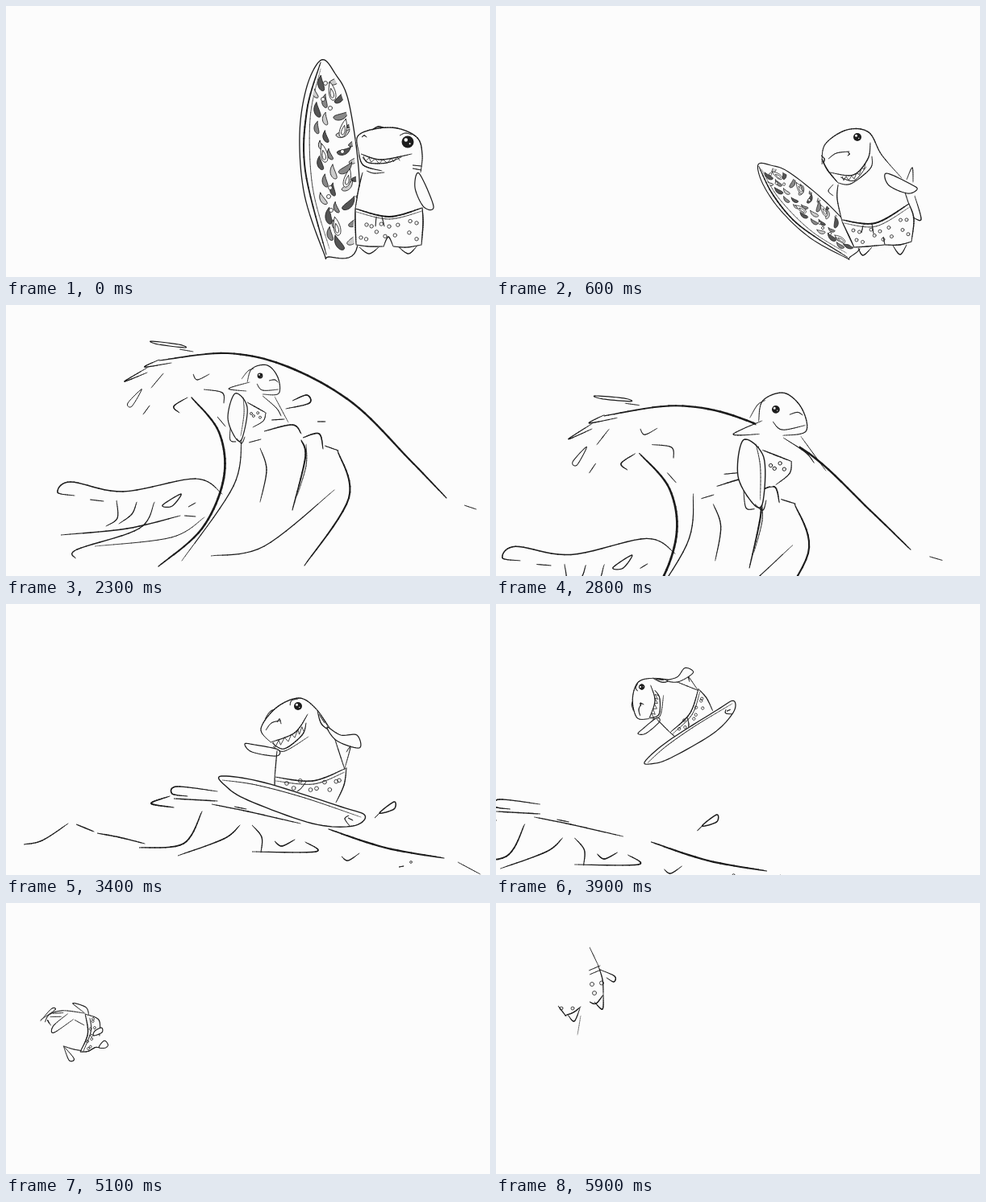
An HTML page with a canvas for the animation above (6 s loop, 600 px wide and 337 px high).

```html
<!DOCTYPE html>
<html lang="en">
<head>
<meta charset="utf-8">
<title>Surfing shark</title>
<style>
html, body { margin: 0; width: 100%; height: 100%; overflow: hidden; background: #fcfcfc; }
canvas { display: block; width: 600px; height: 337px; }
</style>
</head>
<body>
<canvas id="stage" width="600" height="337"></canvas>
<script>
const ctx = document.getElementById('stage').getContext('2d');
const PAPER = '#fcfcfc', INK = '#1c1c1c', LOOP = 6000;
let thin = 1;     // keeps line weight readable when a drawing is scaled
let reveal = 1;   // drawn share of each brush stroke

function points(text) {
  const p = [];
  text.split(' ').forEach(s => p.push(s.split(',').map(Number)));
  return p;
}

// Catmull-Rom through the points, sampled to a polyline.
function curve(text, closed) {
  const p = points(text), n = p.length, out = [], segs = closed ? n : n - 1;
  const at = i => closed ? p[(i + n) % n] : p[Math.max(0, Math.min(n - 1, i))];
  for (let i = 0; i < segs; i++) {
    const [a, b, c, d] = [at(i - 1), at(i), at(i + 1), at(i + 2)];
    for (let k = 0; k < 10; k++) {
      const u = k / 10;
      out.push([0, 1].map(j => b[j] + .5 * u * (c[j] - a[j]
        + u * (2 * a[j] - 5 * b[j] + 4 * c[j] - d[j]
        + u * (3 * (b[j] - c[j]) + d[j] - a[j])))));
    }
  }
  out.push(at(segs));
  return out;
}

function trace(p) {
  ctx.beginPath();
  p.forEach(q => ctx.lineTo(q[0], q[1]));
}

function dot(x, y, r) {
  ctx.beginPath();
  ctx.arc(x, y, r, 0, 7);
}

// Tapered brush stroke.
function ink(size, text) {
  const p = curve(text), last = p.length - 1, end = Math.round(last * reveal);
  for (let i = 0; i < end; i++) {
    ctx.lineWidth = size * thin * (.35 + .65 * Math.sqrt(Math.sin(Math.PI * (i + .5) / last)));
    trace([p[i], p[i + 1]]);
    ctx.stroke();
  }
}

// Closed outline on paper; size 0 only covers what lies behind.
function shape(size, text) {
  trace(curve(text, true));
  ctx.closePath();
  ctx.fillStyle = PAPER;
  ctx.fill();
  ctx.lineWidth = size * thin;
  if (size) ctx.stroke();
}

// Zigzag hanging from a curve.
function teeth(n, depth, text) {
  const p = curve(text), last = p.length - 1, zig = [];
  for (let i = 0; i <= n; i++) {
    const [x, y] = p[Math.round(last * i / n)];
    zig.push([x, y + (i % 2) * depth]);
  }
  ctx.lineWidth = .8 * thin;
  trace(zig);
  ctx.stroke();
}

// Small blossoms scattered to both sides of a curve.
function blossoms(n, r, spread, text) {
  const p = curve(text), last = p.length - 1;
  ctx.lineWidth = .8 * thin;
  for (let i = 0; i < n; i++) {
    const [x, y] = p[Math.round(last * i / Math.max(1, n - 1))];
    dot(x, y + spread * Math.sin(i * 2.3), r);
    ctx.stroke();
  }
}

function eye(x, y, r) {
  ctx.fillStyle = INK;
  dot(x, y, r); ctx.fill();
  ctx.fillStyle = PAPER;
  dot(x - r * .3, y - r * .35, r * .3); ctx.fill();
  dot(x + r * .35, y + r * .3, r * .13); ctx.fill();
}

function leaf(x, y, h, rot, bend, fill) {
  ctx.save();
  ctx.translate(x, y);
  ctx.rotate(rot);
  ctx.beginPath();
  ctx.moveTo(0, -h);
  ctx.bezierCurveTo(h * .5 + bend, -h * .2, h * .4, h * .8, 0, h * .8);
  ctx.bezierCurveTo(-h * .4, h * .8, -h * .4 + bend, -h * .2, 0, -h);
  ctx.fillStyle = fill;
  ctx.fill();
  ctx.stroke();
  ctx.restore();
}

function board() {
  shape(1.3, '391,67 373,100 364,160 370,235 394,307 400,312 434,304 438,215 425,120 408,84');
  ink(2, '390,70 373,130 371,205 397,309');
  ink(.8, '390,78 377,140 380,225 401,302');
  ctx.save();
  trace(curve('390,78 377,145 381,225 402,301 431,297 433,200 415,108', true));
  ctx.clip();
  let seed = 7;
  const rnd = () => (seed = seed * 16807 % 2147483647) / 2147483647;
  ctx.lineWidth = .8 * thin;
  for (let i = 0; i < 40; i++) {
    const y = 86 + i * 5.5, mid = 393 + (y - 80) * .11, odd = i % 2;
    const x = mid + (odd ? 18 : -11) + (i % 4 < 2 ? -6 : 6) + rnd() * 6;
    leaf(x, y, 7 + rnd() * 5, (odd ? .6 : -.6) + rnd() * .6, odd ? 5 : -5, ['#888', '#ccc', '#555'][i % 3]);
  }
  points('404,107 418,153 394,184 423,215 410,275').forEach(([x, y], i) => {
    const turn = i % 2 ? .25 : -.2;
    leaf(x, y, 13, turn, 0, PAPER);
    leaf(x, y + 2, 6.5, turn, 0, PAPER);
  });
  ctx.fillStyle = PAPER;
  points('396,96 393,116 402,127 417,181 402,226 400,237 403,254').forEach(([x, y]) => {
    dot(x, y, 2.5);
    ctx.fill();
    ctx.stroke();
  });
  ctx.restore();
}

function standing() {
  shape(0, '436,162 470,150 510,164 514,205 517,250 515,297 475,291 434,297 433,252 442,205 437,180');
  ink(1.4, '437,181 436,162 456,153 485,152 510,164 516,185 514,207');
  ink(1.2, '454,154 461,150 468,151');
  ink(1.3, '437,181 443,198 466,205');
  ink(1.4, '440,184 465,191 503,184');
  ink(1.2, '442,188 450,195 472,195 490,188');
  teeth(11, 5, '443,187 465,191 488,187');
  ink(.8, '441,163 444,161 447,163');
  ink(.8, '488,161 495,158 503,160');
  eye(498, 169, 7.5);
  ink(1, '504,198 515,199');
  ink(1, '504,202 515,204');
  ink(1.3, '442,207 437,228 433,252');
  ink(.9, '447,205 456,208 469,207');
  shape(1.2, '512,208 530,249 518,250 507,226');
  ink(1.9, '433,252 475,262 516,251');
  ink(.8, '434,256 475,265 516,255');
  ink(1.5, '433,252 433,270 434,297');
  ink(1.5, '516,251 517,270 515,297');
  ink(1.2, '434,297 450,299 468,299');
  ink(1.2, '468,299 474,287 480,299');
  ink(1.2, '480,299 497,300 515,297');
  ink(1, '459,262 458,274');
  ink(1, '466,262 469,274');
  blossoms(7, 2.2, 2, '447,272 475,273 509,268');
  blossoms(7, 2.2, 4, '440,288 470,284 509,286');
  ink(1.2, '438,300 450,308 462,300');
  ink(1.2, '487,300 499,308 509,299');
}

function leaning() {
  shape(0, '403,183 435,154 462,157 503,215 516,293 444,300 429,268 424,222');
  ink(1.3, '404,197 408,172 435,154 462,157 478,185 503,214');
  ink(1.5, '404,190 411,204 424,220');
  ink(1.3, '414,207 443,210 461,190 464,170');
  ink(1.1, '424,220 440,221 464,202 466,187');
  ink(1, '427,213 444,217 459,200');
  teeth(10, 5, '429,212 444,210 458,196');
  ink(1, '412,190 422,183 438,181');
  ink(.8, '436,181 438,184 436,186');
  eye(448, 163, 5);
  ink(1, '403,186 407,190 406,196');
  ink(1.2, '424,222 423,240 429,268');
  shape(1.2, '484,208 515,222 522,228 510,233 487,223');
  ink(1, '507,232 512,247');
  ink(1, '509,216 516,201 517,219');
  ink(1.2, '519,236 527,265 517,263');
  ink(1.9, '429,266 470,270 512,246');
  ink(.8, '431,270 471,274 513,250');
  ink(1.4, '429,268 437,285 444,300');
  ink(1.4, '512,246 518,265 515,293');
  ink(1.3, '444,300 460,299 482,297');
  ink(1.3, '482,297 500,297 515,293');
  ink(1, '480,287 482,297');
  ink(1, '455,273 453,282');
  ink(1, '466,271 468,283');
  blossoms(7, 2, 2, '443,279 476,279 509,264');
  blossoms(7, 2, 4, '447,291 480,288 511,280');
  ink(1.2, '449,301 455,310 466,300');
  ink(1.2, '492,298 501,309 509,297');
  ink(.8, '418,236 412,230 418,222');
}

function perched() {
  shape(0, '364,47 374,30 402,35 411,66 392,83 388,115 350,111 348,83 368,56');
  ink(1.2, '364,47 374,31 393,29 407,45 411,66 403,67');
  ink(1.1, '364,47 370,54 390,54');
  ink(1.2, '366,51 388,61 398,56');
  eye(397, 48, 3.8);
  ink(1.1, '366,57 351,80 348,84');
  ink(1.1, '400,68 392,83 392,89');
  ink(1, '363,40 356,50 358,60');
  ink(1, '391,76 399,97 394,95');
  ink(1.6, '348,83 372,93 392,89');
  ink(1.2, '348,83 346,100 350,111');
  ink(1.2, '391,89 393,103 388,115');
  ink(1.1, '350,111 365,115 388,116');
  blossoms(5, 1.8, 2, '354,95 372,99 387,97');
  blossoms(5, 1.8, 2, '353,104 370,108 386,106');
  ink(1.1, '390,107 405,111 390,118');
  ink(1, '349,112 353,120 358,115');
  ink(1, '371,117 380,122 387,118');
}

function riding() {
  shape(0, '300,90 312,75 332,80 340,105 320,135 300,152 296,106');
  ink(1.1, '299,96 305,79 324,75 337,90 338,110 318,111');
  ink(.9, '311,98 318,106 338,105');
  ink(.8, '326,94 333,93 337,96');
  eye(315, 88, 3.4);
  ink(.7, '292,92 300,82 307,79');
  ink(1, '302,96 276,104 298,107');
  ink(1, '318,113 335,128 341,138');
  ink(.8, '333,114 350,146');
  ink(1.2, '299,121 322,134');
  ink(1, '322,134 319,144 306,152');
  blossoms(4, 1.5, 3, '304,135 315,138');
  shape(1.2, '284,110 275,140 285,166 293,165 299,127');
  ink(.7, '294,115 295,135 291,163');
  ink(.9, '278,153 278,168 285,170');
  ink(.9, '286,166 292,172 296,164');
}

function gliding() {
  shape(0, '316,155 350,121 375,120 405,160 422,205 409,248 333,224 332,178');
  ink(1.3, '328,172 316,155 335,129 363,117 384,130 405,160');
  ink(1, '322,157 329,148 340,145');
  ink(.8, '336,147 339,143 341,149');
  ink(.9, '321,143 327,134 333,131');
  eye(362, 127, 5);
  ink(.8, '352,126 354,120 362,118');
  ink(1.3, '328,172 358,160 374,137');
  ink(1.3, '330,173 345,180 367,163 372,148');
  teeth(11, 7, '331,172 352,163 369,151');
  ink(.9, '331,177 345,183 375,165');
  ink(1.2, '386,133 391,149 402,158');
  ink(1, '388,137 395,148');
  ink(1, '391,139 399,152');
  shape(1.2, '337,181 308,175 296,174 305,184 335,189');
  ink(1.2, '336,182 333,216');
  ink(1.1, '407,166 420,206');
  shape(1.2, '398,153 415,163 435,163 438,179 410,170');
  ink(1, '420,204 427,178 422,184');
  ink(1.5, '333,215 380,220 422,204');
  ink(.9, '334,220 381,224 420,209');
  ink(1.3, '422,204 419,225 409,247');
  ink(1, '333,216 333,226');
  ink(.9, '372,221 366,229 361,233');
  blossoms(9, 2.4, 6, '348,223 385,228 413,222');
  shape(1.4, '267,214 320,222 415,252 445,263 430,276 380,273 300,244 272,226');
  ink(1, '268,219 310,225 370,241 440,265');
  ink(1, '425,263 420,267 426,276');
  ink(1, '424,266 430,269');
}

function diving() {
  ink(1.1, '102,129 88,150 95,155 102,129');
  ink(1, '102,129 107,145 113,158');
  ink(1.5, '110,157 142,150 166,128');
  ink(1, '113,161 148,152 165,138');
  ink(1.3, '110,157 118,167 130,173 134,179');
  ink(1.2, '166,128 171,152 150,168');
  shape(1.3, '145,160 157,168 163,163 152,157');
  shape(1.2, '134,178 139,187 146,188 148,179');
  blossoms(9, 2, 4, '122,165 143,156 167,145');
  ink(1, '114,74 141,77 143,83 116,73');
  ink(1.1, '117,81 132,80 150,95 167,127');
  ink(.8, '119,88 122,83 118,92');
  ink(.8, '129,83 140,98');
  ink(.8, '136,83 147,97');
  ink(1.1, '150,104 120,96 111,103 148,117');
  ink(.8, '148,119 150,137');
  ink(1.1, '167,125 169,101 176,122 169,133');
}

function legs() {
  ink(.9, '116,55 126,76');
  ink(1.2, '126,76 132,95 133,113');
  ink(.9, '115,84 129,78');
  ink(.9, '116,89 130,83');
  ink(1.2, '129,83 147,91 146,98 137,93');
  blossoms(3, 2.5, 2, '119,101 131,98 122,114');
  ink(1.3, '116,123 124,125 133,114');
  ink(1.3, '122,123 132,132 133,114');
  blossoms(2, 2, 0, '81,131 95,131');
  ink(1.2, '77,128 87,141');
  ink(1.3, '85,140 96,136 105,129');
  ink(1.2, '89,139 97,147 104,131');
  ink(.5, '105,140 101,164');
}

function bigWave() {
  ink(1.9, '272,81 325,79 400,102 465,155 520,220 572,254');
  ink(1.2, '272,81 240,95 222,122 242,130 270,115');
  ink(1.3, '270,113 285,119 310,123');
  ink(1.3, '305,126 325,126 345,112');
  ink(2, '270,116 281,165 240,218 150,263');
  ink(1.5, '309,125 313,165 277,220');
  ink(1, '360,115 350,175 290,228');
  ink(1.1, '388,125 367,190 325,228');
  ink(.9, '396,130 375,195');
  ink(1.9, '431,173 425,220 375,268 283,294');
  ink(1.8, '48,302 90,270 150,263 240,276 310,277 370,262');
  ink(.8, '68,314 120,298 210,299');
  ink(1, '388,120 408,137');
  ink(1, '411,130 412,148 432,157');
  ink(1.5, '425,165 434,175 462,168');
  ink(1, '424,176 428,181 422,180');
  ink(1, '461,177 466,211');
  ink(1, '468,180 500,213 560,248');
  ink(1.4, '414,248 428,222 490,221 535,246 521,254');
  ink(1.5, '415,246 436,254 461,256');
  ink(1, '462,240 503,252');
  ink(1.6, '432,258 405,295 340,313');
  ink(1, '453,257 445,290 412,307');
  ink(1.5, '525,258 518,295 490,318');
  ink(1.5, '355,326 410,322 447,295');
  shape(1, '230,155 244,150 237,158');
  blossoms(2, 2.3, 0, '316,91 394,282');
  blossoms(2, 1.5, 0, '434,90 456,207');
}

function barrel() {
  ink(2.5, '190,69 275,60 350,77 430,122 500,192 546,240');
  ink(.9, '568,249 583,254');
  shape(1.2, '180,45 214,49 222,53 189,49');
  ink(.9, '215,55 232,58');
  ink(1.3, '205,72 172,77 190,68');
  ink(1.3, '175,78 147,95 175,84');
  shape(1, '168,105 151,122 156,126');
  ink(1, '178,125 170,136');
  ink(1, '195,85 180,103');
  ink(1, '232,86 237,93 252,86');
  ink(1.3, '225,115 208,126 215,134');
  ink(2.7, '230,115 264,158 270,215 243,278 189,325');
  ink(1.3, '292,165 282,225 218,318');
  ink(1.3, '315,178 323,205 315,245');
  ink(2, '366,168 371,190 355,255');
  ink(.9, '372,173 372,200 361,237');
  ink(2.1, '411,181 425,240 370,324');
  ink(1.3, '254,312 320,300 407,230');
  ink(1.6, '320,157 355,149 366,160');
  ink(1.6, '368,165 388,160 393,179');
  ink(1.5, '355,119 373,112 376,122 347,129');
  ink(1.2, '395,175 412,181');
  ink(1.1, '245,105 268,109 270,122');
  ink(1, '262,139 272,151');
  ink(1, '301,171 316,167');
  ink(1.1, '329,143 345,142');
  ink(1, '386,145 396,145');
  ink(1.5, '85,237 64,233 80,220 145,232 235,216 268,235');
  ink(1.1, '104,242 121,244');
  ink(1.2, '137,243 138,265 124,275');
  ink(1.2, '162,245 156,260 140,272');
  ink(1.4, '184,245 165,278 88,304 86,315');
  ink(1.5, '68,286 150,278 216,262');
  ink(1, '110,300 205,289 246,264');
  shape(1.3, '194,249 217,235 206,250');
  ink(1, '226,251 235,246');
  ink(1, '221,262 235,263');
}

function surf() {
  ink(1.4, '22,299 45,294 77,273');
  ink(1.4, '87,274 109,283');
  ink(1.5, '113,285 140,290 172,298');
  ink(1.8, '165,303 220,298 243,258');
  ink(1.5, '262,233 212,227 206,236 225,239');
  ink(1.8, '208,253 180,248 203,239');
  ink(1.5, '208,242 262,245');
  ink(1.5, '213,313 270,292 290,275');
  ink(1.4, '255,249 300,258 365,273');
  ink(1.3, '305,275 317,290 316,309');
  ink(1.5, '305,308 384,308 371,296');
  ink(1.4, '333,295 342,301 358,293');
  ink(1.2, '416,314 424,319 438,310');
  ink(2.3, '400,280 470,303 543,316');
  ink(1, '560,321 588,336');
  shape(1.5, '463,260 481,246 481,255');
  ink(1, '457,266 463,260');
  ink(1, '487,327 493,326');
  blossoms(1, 1.4, 0, '502,321 503,321');
  ink(1.1, '283,252 298,255');
}

function ripple() {
  ink(1.5, '5,336 40,322 46,326');
  ink(1.5, '46,326 48,317 60,315 105,326');
  ink(1.5, '123,333 160,337 220,334');
  ink(1, '172,316 174,314');
}

// Key text: time dx dy degrees scale squash reveal, separated by slashes.
const REST = [0, 0, 0, 0, 1, 1, 1];
const cast = [];
function actor(show, from, to, px, py, text) {
  const keys = text.split('/').map(k => {
    const n = k.trim().split(' ').map(Number);
    return REST.map((r, i) => n[i] ?? r);
  });
  cast.push({ show, from, to, px, py, keys });
}

actor(bigWave, 800, 2100, 310, 200,
  '800 75 40 0 .85 1 .2 / 1100 45 15 0 .92 / 1500 / 1600 -5 0 / 2000 -22 8 -2');
actor(barrel, 2100, 2900, 320, 190, '2100 10 0 2 / 2300 / 2600 -20 50 / 2800 -45 70 -2 1.05');
actor(surf, 2900, 4100, 300, 280, '2900 25 12 / 3400 / 3600 -110 4 / 4000 -240 20');
actor(ripple, 4100, 4600, 110, 325, '4100 100 -12 / 4400 / 4500 -40 10');
actor(board, 0, 2100, 417, 308,
  '100 / 300 4 -1 -5 .97 / 600 28 -5 -42.5 .66 / 800 20 -15 -42 .64 / 900 0 -80 -20 .52'
  + '/ 1000 -22 -170 5 .42 .75 / 1500 -72 -200 9 .38 .66 / 2000 -107 -175 4 .38 .66');
actor(standing, 0, 400, 475, 300, '0 / 100 0 0 1 / 300 -2 0 -4');
actor(leaning, 400, 1000, 475, 300, '400 4 0 8 1.03 / 600 / 800 -8 -12 -3 .96 / 900 -30 -85 0 .75');
actor(perched, 1000, 2100, 375, 90, '1000 50 30 6 1.1 / 1500 / 2000 -35 25 -6');
actor(riding, 2100, 2900, 305, 125, '2100 20 -22 8 .95 / 2300 / 2600 20 45 -5 1.2 / 2800 35 60 -8 1.45');
actor(gliding, 2900, 4000, 360, 200,
  '2900 0 5 8 .72 / 3400 / 3600 -50 -4 -6 .95 / 3800 -100 -42 -28 .82 / 3900 -140 -62 -50 .72');
actor(diving, 4000, 5300, 131, 131,
  '4000 65 -10 40 1.1 / 4400 / 4600 -42 29 -15 .85 / 5100 -46 30 -55 .75');
actor(legs, 5300, 6000, 112, 110, '5300 -18 45 -25 / 5800 0 10 -4 / 5900');

function pose(keys, t) {
  const next = keys.findIndex(k => k[0] >= t);
  const b = keys[next < 0 ? keys.length - 1 : next];
  const a = next > 0 ? keys[next - 1] : b;
  const u = a === b ? 0 : (t - a[0]) / (b[0] - a[0]);
  return a.map((v, i) => v + (b[i] - v) * u);
}

function paint(t) {
  ctx.fillStyle = PAPER;
  ctx.fillRect(0, 0, 600, 337);
  ctx.strokeStyle = INK;
  ctx.lineCap = ctx.lineJoin = 'round';
  for (const { show, from, to, px, py, keys } of cast) {
    if (t < from || t >= to) continue;
    const [, x, y, turn, scale, squash, share] = pose(keys, t);
    ctx.save();
    ctx.translate(px + x, py + y);
    ctx.rotate(turn * Math.PI / 180);
    ctx.scale(scale * squash, scale);
    ctx.translate(-px, -py);
    thin = scale ** -.6;
    reveal = share;
    show();
    ctx.restore();
  }
}

// Ten drawings a second; every fifth one is held for two beats.
let shown = -1;
function run(now) {
  let beat = Math.floor(now % LOOP / 100);
  if (beat % 5 === 2) beat--;
  if (beat !== shown) paint((shown = beat) * 100);
  requestAnimationFrame(run);
}
run(performance.now());
</script>
</body>
</html>
```
